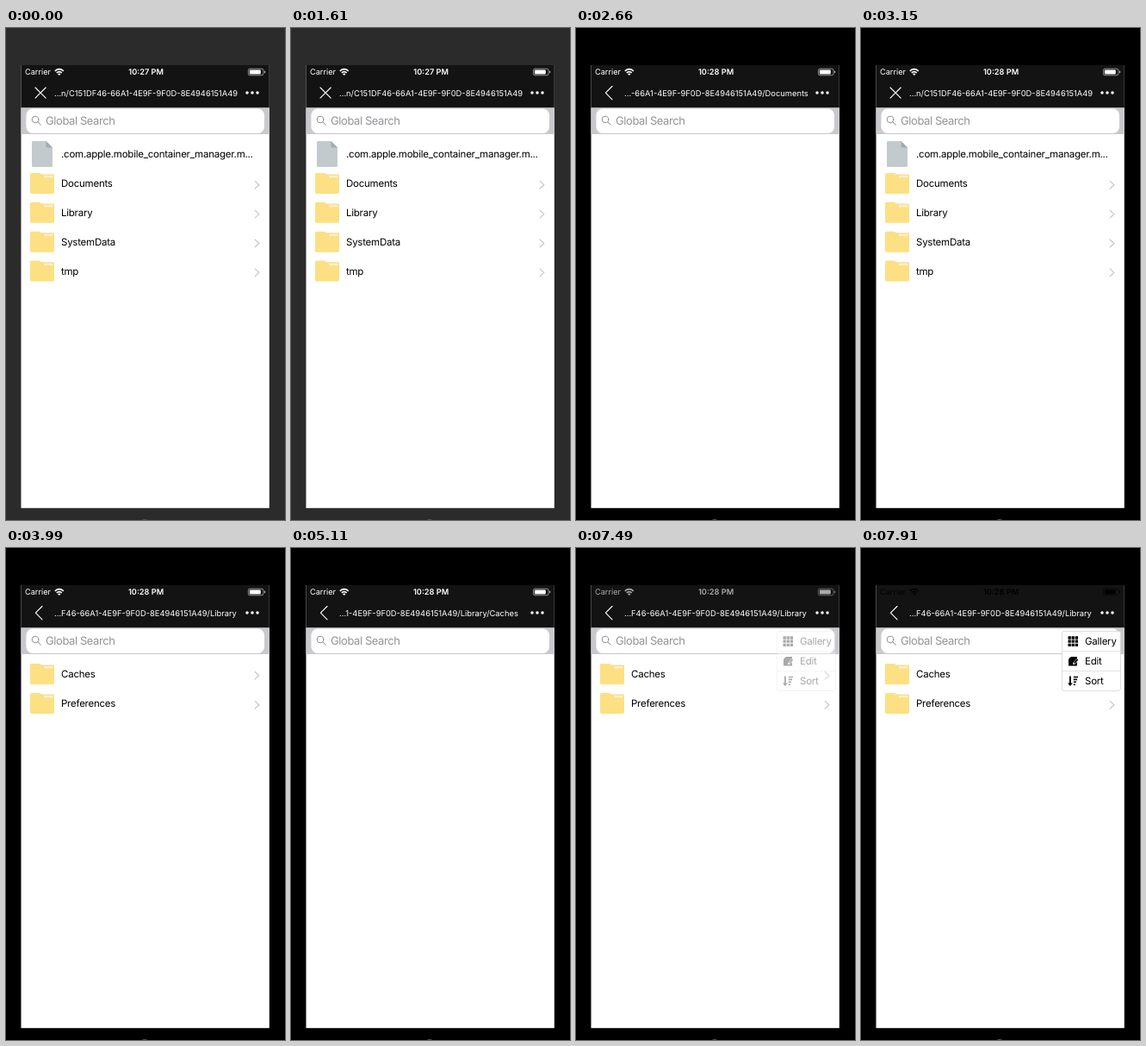
Recreate the animation shown at these times as an HTML page. Size 324x570 px, loop 8 s.

```html
<!DOCTYPE html>
<html lang="en">
<head>
<meta charset="utf-8">
<title>File browser</title>
<style>
  html, body { margin: 0; width: 100%; height: 100%; overflow: hidden; background: #000; }
  svg { display: block; width: 324px; height: 570px; }
  text { font-family: Inter, Roboto, sans-serif; text-rendering: geometricPrecision; }
  .small { font-size: 9.2px; }
  .title { font-size: 9.36px; }
  .label { font-size: 11.5px; letter-spacing: -.24px; fill: #000; }
  .search { font-size: 13px; letter-spacing: -.42px; fill: #939398; }
  .line { fill: none; stroke-linecap: round; stroke-linejoin: round; }
</style>
</head>
<body>
<svg viewBox="0 0 324 570">
  <defs>
    <g id="folder">
      <path d="M12 1.6H26.5Q28 1.6 28 3V12H12Z" fill="#f9dc8b"/>
      <path d="M16 3H26.5V6H16Z" fill="#fff0c4"/>
      <path d="M0 1.5Q0 0 1.5 0H10.5Q11.7 0 12.3 1.2L14 5.6H26.6Q28 5.6 28 7V22.4Q28 24 26.4 24H1.6Q0 24 0 22.4Z" fill="#fce083"/>
    </g>
    <g id="file">
      <path d="M1.5 0H16.5L24 7.5V28.5Q24 30 22.5 30H1.5Q0 30 0 28.5V1.5Q0 0 1.5 0Z" fill="#c3cacd"/>
      <path d="M16.5 0L24 7.5H18Q16.5 7.5 16.5 6Z" fill="#a2abaf"/>
    </g>
    <path id="chevron" class="line" d="M0 -4.3L4.6 0L0 4.3" stroke="#c7c7cb" stroke-width="1.2"/>
  </defs>

  <rect id="bezel" width="324" height="570"/>
  <circle cx="161" cy="575" r="6" fill="#555"/>
  <rect x="17.5" y="43" width="288.3" height="513.2" fill="#fff"/>
  <rect x="17.5" y="43" width="288.3" height="49.5" fill="#131313"/>

  <g id="status">
    <text class="small" x="22" y="54.3">Carrier</text>
    <g fill="none" stroke="currentColor" stroke-width="1.6">
      <path d="M56.8 49.8Q61.8 45.4 66.8 49.8M58.8 51.9Q61.8 49.3 64.8 51.9"/>
    </g>
    <path d="M60 53.2Q61.8 51.8 63.6 53.2L61.8 55Z"/>
    <text id="clock" class="small" x="162.6" y="54.3" text-anchor="middle" font-weight="600"></text>
    <rect x="281.4" y="47.2" width="17.6" height="7.6" rx="2" fill="none" stroke="currentColor" stroke-width=".8" opacity=".65"/>
    <rect x="282.8" y="48.5" width="13" height="5" rx=".9"/>
    <path d="M300 49.6Q301.4 50 301.4 51T300 52.4Z" opacity=".65"/>
  </g>

  <g class="line" stroke="#fff" stroke-width="1.1">
    <path id="close" d="M34 69L46.2 81.2M46.2 69L34 81.2"/>
    <path id="back" d="M42 67.5L34.4 75.2L42 82.9"/>
  </g>
  <text id="title" class="title" x="56" y="78.6" fill="#fff"></text>
  <g fill="#fff">
    <circle cx="280" cy="75" r="1.75"/><circle cx="286" cy="75" r="1.75"/><circle cx="292" cy="75" r="1.75"/>
  </g>

  <rect x="17.5" y="92.5" width="288.3" height="30.5" fill="#c9c9cd"/>
  <rect x="23.4" y="93.5" width="276.6" height="28.5" rx="7.5" fill="#fff"/>
  <g class="line" stroke="#8e8e93" stroke-width="1">
    <circle cx="34" cy="106" r="3.8"/><path d="M36.8 108.8L40.4 112.3"/>
  </g>
  <text class="search" x="46" y="111.7">Global Search</text>

  <g id="list"></g>

  <g id="menu">
    <rect x="233.4" y="96.4" width="68" height="69" rx="2.5" fill="#fff" stroke="#d2d2d4" stroke-width=".8"/>
    <path d="M234 119.5H301M234 142.5H301" stroke="#dcdcde" stroke-width=".8"/>
    <path d="M240.5 104H252M240.5 108.2H252M240.5 112.4H252" stroke="#000" stroke-width="3.3" stroke-dasharray="3.3 .8"/>
    <path d="M244 126H251V128L246.5 132.5L246 135L248.5 134.5L251 132V136.4H241V129Z"/>
    <path d="M247.6 133.4L251.6 129.2" stroke="#000" stroke-width="1.7"/>
    <path d="M241.4 128.2L243.2 126.3V128.2Z"/>
    <path d="M242 148.5H243.8V156.5H245.8L242.9 160L240 156.5H242Z"/>
    <path d="M246.8 149.5H252M246.8 152.4H251M246.8 155.3H250M246.8 158.2H249" stroke="#000" stroke-width="1.6"/>
    <text class="label" x="260" y="112.1">Gallery</text>
    <text class="label" x="260" y="135.1">Edit</text>
    <text class="label" x="260" y="158.1">Sort</text>
  </g>
</svg>
<script>
  const LOOP = 8000;
  const el = id => document.getElementById(id);

  const root = {
    title: '...n/C151DF46-66A1-4E9F-9F0D-8E4946151A49',
    rows: ['.com.apple.mobile_container_manager.m...', 'Documents', 'Library', 'SystemData', 'tmp'],
    top: true
  };
  const documents = { title: '...-66A1-4E9F-9F0D-8E4946151A49/Documents', rows: [] };
  const library = { title: '...F46-66A1-4E9F-9F0D-8E4946151A49/Library', rows: ['Caches', 'Preferences'] };
  const caches = { title: '...1-4E9F-9F0D-8E4946151A49/Library/Caches', rows: [] };

  const visits = [
    [0, root], [1820, documents], [3150, root],
    [3990, library], [5110, caches], [6300, library]
  ];

  function rowMarkup(name, index) {
    const y = 146.4 + index * 33.9;
    const isFile = name.startsWith('.');
    const icon = isFile
      ? `<use href="#file" x="30" y="${y - 15.4}"/>`
      : `<use href="#folder" x="28" y="${y - 12.4}"/><use href="#chevron" x="289.2" y="${y + 1.4}"/>`;
    return `${icon}<text class="label" x="64" y="${y + 4}">${name}</text>`;
  }

  let shown;
  function show(page) {
    if (page === shown) return;
    shown = page;
    el('title').textContent = page.title;
    el('list').innerHTML = page.rows.map(rowMarkup).join('');
    el('close').style.display = page.top ? '' : 'none';
    el('back').style.display = page.top ? 'none' : '';
  }

  function draw(now) {
    const t = now % LOOP;
    show(visits.findLast(([start]) => t >= start)[1]);

    const later = t >= 1750;
    el('bezel').setAttribute('fill', later ? '#000' : '#2b2b2b');
    el('clock').textContent = later ? '10:28 PM' : '10:27 PM';

    // The menu fades in over three steps while the status bar turns dark.
    const fade = Math.min(1, Math.max(0, Math.floor((t - 7420) / 70) / 3));
    el('menu').style.opacity = fade;
    const shade = Math.round(255 * (1 - fade));
    const color = `rgb(${shade}, ${shade}, ${shade})`;
    el('status').style.color = color;
    el('status').style.fill = color;
  }

  function tick() {
    draw(performance.now());
    requestAnimationFrame(tick);
  }
  tick();
</script>
</body>
</html>
```
